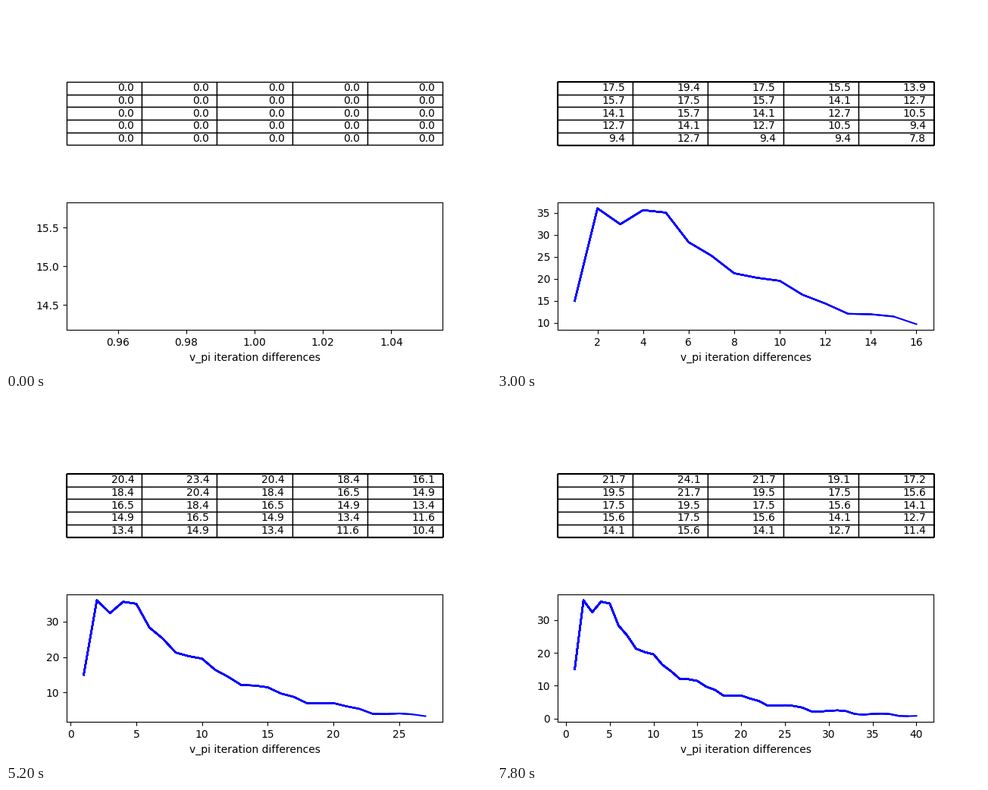
Animation of 640x480 px, one loop 8000 ms. Source, as a matplotlib script:

```python
import numpy as np
import matplotlib.pyplot as plt
from matplotlib.animation import FuncAnimation

SIZE = 5
GAMMA = 0.9
FRAMES = 40
LAYERS = 16  # stacked tables that still darken the outer border
JUMPS = {(0, 1): ((4, 1), 10), (0, 3): ((2, 3), 5)}
MOVES = [(-1, 0), (1, 0), (0, -1), (0, 1)]


def step(cell, move):
    """Return the next cell and the reward of one move."""
    if cell in JUMPS:
        return JUMPS[cell]
    row, col = cell[0] + move[0], cell[1] + move[1]
    if 0 <= row < SIZE and 0 <= col < SIZE:
        return (row, col), 0
    return cell, -1


def sweep(values):
    """One synchronous sweep of value iteration."""
    result = np.zeros_like(values)
    for cell in np.ndindex(values.shape):
        outcomes = [step(cell, move) for move in MOVES]
        result[cell] = max(r + GAMMA * values[nxt] for nxt, r in outcomes)
    return result


history = [np.zeros((SIZE, SIZE))]
for _ in range(FRAMES):
    history.append(sweep(history[-1]))
diffs = [np.abs(b - a).sum() for a, b in zip(history, history[1:])]

fig, (grid_ax, diff_ax) = plt.subplots(2, 1, figsize=(6.4, 4.8), dpi=100)
grid_ax.axis("off")
diff_ax.set_xlabel("v_pi iteration differences")


def make_table(values):
    text = [[f"{v:.1f}" for v in row] for row in values]
    table = grid_ax.table(cellText=text, loc="center")
    table.auto_set_font_size(False)
    table.set_fontsize(10)
    return table


tables = [make_table(values) for values in history[:FRAMES]]
lines = [diff_ax.plot(range(1, n + 1), diffs[:n], "b")[0]
         for n in range(1, FRAMES + 1)]


def draw(k):
    for i, (table, line) in enumerate(zip(tables, lines)):
        table.set_visible(k - LAYERS < i <= k)
        for cell in table.get_celld().values():
            cell.get_text().set_visible(i == k)
        line.set_visible(i <= k)
    diff_ax.relim(visible_only=True)
    diff_ax.autoscale_view()
    return []


anim = FuncAnimation(fig, draw, frames=FRAMES, interval=200, repeat=True,
                     repeat_delay=0, blit=False)
plt.show()
```
